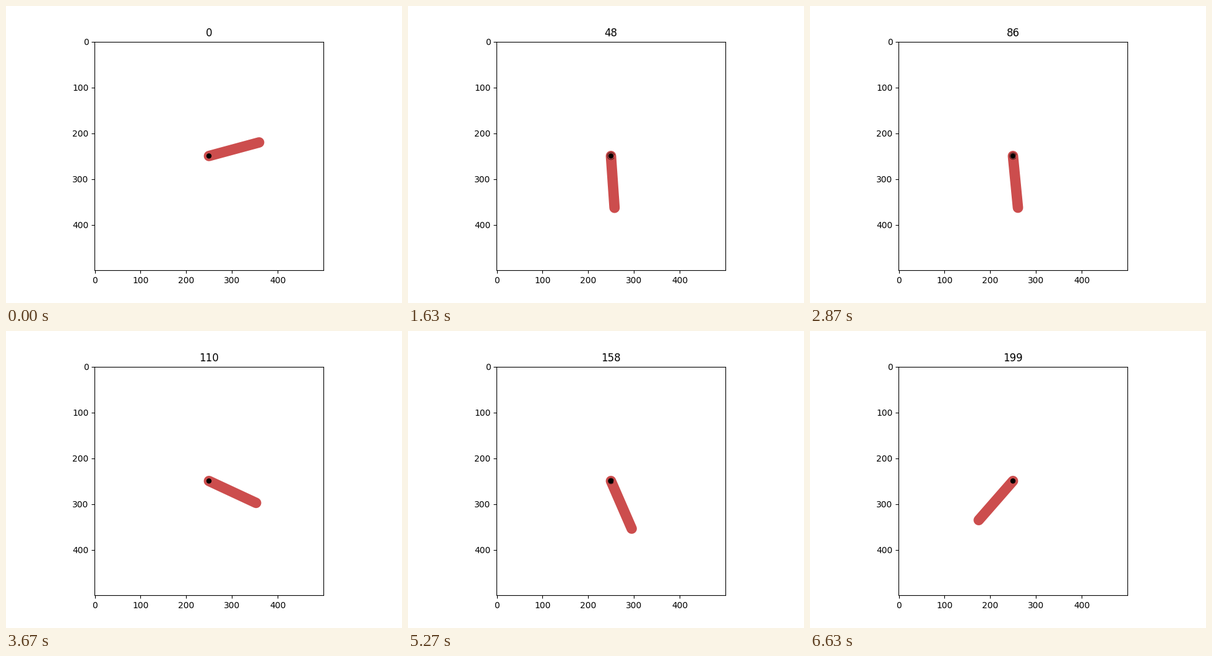
A matplotlib script for the animation above (6660 ms loop, 640 by 480 pixels).

```python
import numpy as np
import matplotlib.pyplot as plt
from matplotlib.animation import FuncAnimation
from matplotlib.patches import Arc, Circle

FRAMES = 200
SIZE = 500                     # side of the view in data units
PIVOT = SIZE / 2 - 0.5
UNIT = SIZE / 4.4              # rod length
PX = 0.7392                    # screen pixels per data unit

# Times (in frames) at which the rod hangs straight down
CROSSINGS = [-11.65, 8.85, 28.5, 48.25, 67.35, 86.37, 104.7,
             123.35, 141.46, 159.8, 177.42, 195.4, 212.3]
# Swing height in degrees at each turn: right, left, right, ...
TURNS = [107.3, 98, 96.5, 90, 88.5, 82, 82, 75.5, 77, 70.6, 70.3, 64]


def swing(height, phase):
    """Exact pendulum waveform as a Fourier series in the elliptic nome."""
    root = np.sqrt(np.cos(height / 2))
    e = 0.5 * (1 - root) / (1 + root)
    q = e + 2 * e**5
    return sum(8 * (-1)**n * q**(n + 0.5) / (m * (1 + q**m)) * np.cos(m * phase)
               for n, m in enumerate((1, 3, 5, 7)))


def angle(t):
    """Angle from straight down, positive to the right."""
    phase = np.interp(t, CROSSINGS, np.pi * (np.arange(len(CROSSINGS)) - 0.5))
    i = min(max(int(phase // np.pi), 0), len(TURNS) - 2)
    ease = (1 - np.cos(phase - i * np.pi)) / 2
    height = TURNS[i] + (TURNS[i + 1] - TURNS[i]) * ease
    return swing(np.radians(height), phase)


fig, ax = plt.subplots(figsize=(6.4, 4.8), dpi=100)
ax.set_aspect("equal")
ax.set_xlim(-0.5, SIZE - 0.5)
ax.set_ylim(SIZE - 0.5, -0.5)
ax.set_xticks(range(0, SIZE, 100))
ax.set_yticks(range(0, SIZE, 100))
title = ax.set_title("0")

rod, = ax.plot([], [], color=(0.8, 0.3, 0.3), lw=0.2 * UNIT * PX * 0.72,
               solid_capstyle="round")
ax.add_patch(Circle((PIVOT, PIVOT), 0.05 * UNIT, fc="black", lw=0, zorder=3))
torque = ax.add_patch(Arc((PIVOT, PIVOT), 1, 1, theta1=30, theta2=345,
                          ec="black", lw=0.7, alpha=0.65, zorder=4))


def update(k):
    a = angle(k)
    rod.set_data([PIVOT, PIVOT + UNIT * np.sin(a)],
                 [PIVOT, PIVOT + UNIT * np.cos(a)])
    # The brake acts on leftward swings only
    speed = angle(k + 0.5) - angle(k - 0.5)
    size = 56 * max(-speed, 0)
    torque.set_visible(size > 1)
    torque.width = torque.height = max(size, 1)
    title.set_text(str(k))
    return rod, torque, title


anim = FuncAnimation(fig, update, frames=FRAMES, interval=33.3,
                     repeat=True, repeat_delay=0, blit=False)
plt.show()
```
